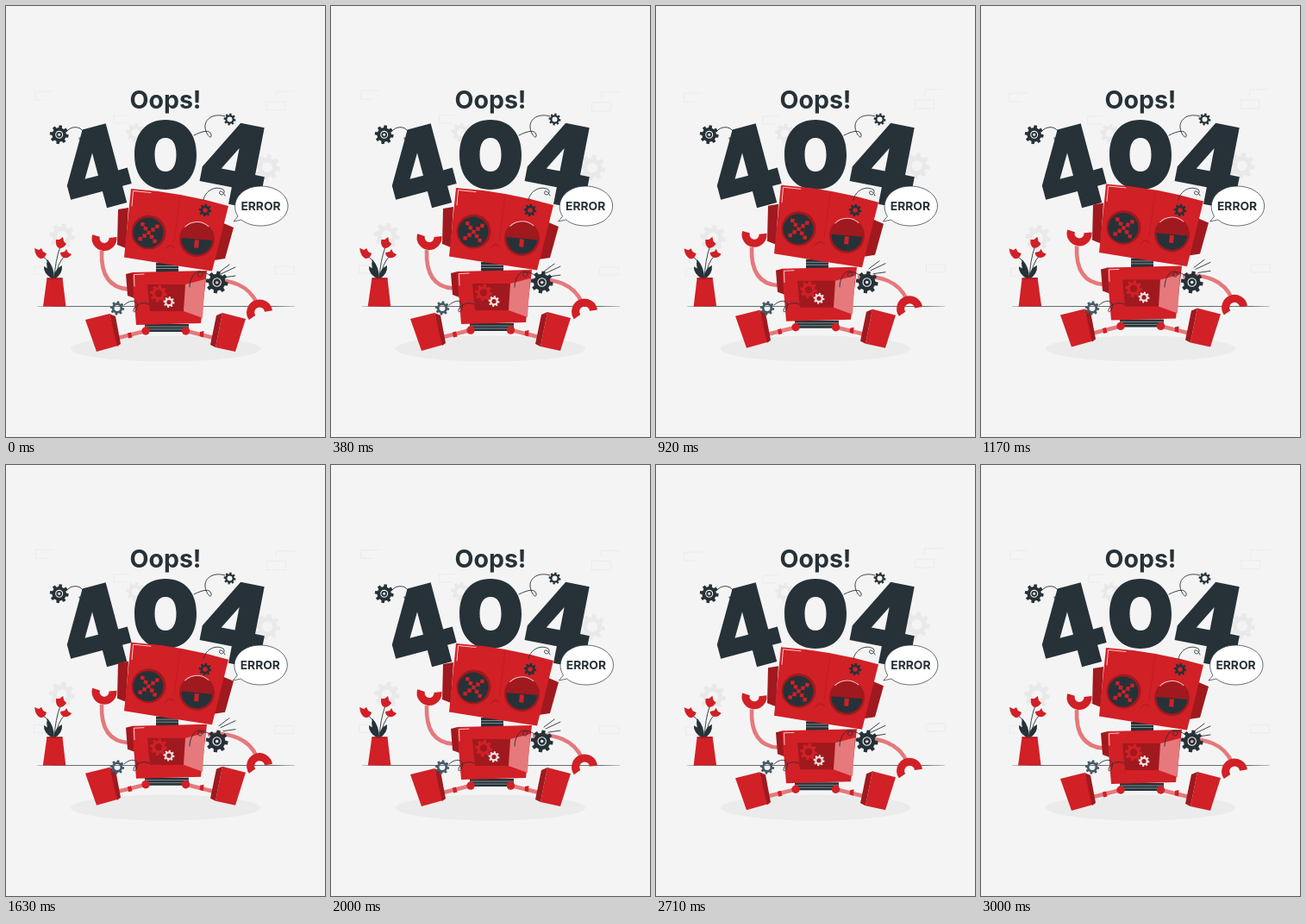
These frames come from a looping animation (370x500 px, 3040 ms). An HTML page:

```html
<!DOCTYPE html>
<html lang="en">
<head>
<meta charset="utf-8">
<title>Oops! 404</title>
<style>
  html, body { margin: 0; width: 100%; height: 100%; overflow: hidden; background: #f4f4f4; }
  svg { display: block; width: 370px; height: 500px; }
  text { font-family: Inter, "Open Sans", sans-serif; font-weight: 700; fill: #263238; text-anchor: middle; }
  .ink { fill: #263238; }
  .red { fill: #d12026; }
  .deep { fill: #a0191e; }
  .pale { fill: #ebebeb; }
  .wire { fill: none; stroke: #263238; stroke-width: .9; stroke-linecap: round; }
  .limb { fill: none; stroke: #e5797c; stroke-width: 4.6; }
  .claw { fill: none; stroke: #d12026; stroke-width: 9; }
  .frame { fill: none; stroke: #e9e9e9; stroke-width: .8; }
  .shine { fill: none; stroke: #f6c9ca; stroke-width: 1; stroke-linecap: round; }
</style>
</head>
<body>
<svg viewBox="0 0 370 500">
  <defs>
    <path id="four" fill-rule="evenodd" d="M-8-45H20V11H31V30H20V50H-4V30H-42V13ZM-4-16L-20 11H-4Z"/>
    <linearGradient id="fade" gradientUnits="userSpaceOnUse" x1="35" x2="336" y1="0" y2="0">
      <stop offset="0" stop-color="#263238" stop-opacity=".3"/>
      <stop offset=".08" stop-color="#263238"/>
      <stop offset=".92" stop-color="#263238"/>
      <stop offset="1" stop-color="#263238" stop-opacity=".3"/>
    </linearGradient>
  </defs>

  <g id="backdrop">
    <path class="frame" d="M55 99H34V109H48M335 99H313V106M302 111H324V121H302ZM143 127H125V136H140M53 302H33V311H48M312 302H334V311H312Z"/>
    <g id="paleGears"></g>
  </g>

  <ellipse class="pale" cx="185" cy="397.5" rx="110" ry="15"/>
  <path d="M36 348.5H335" stroke="url(#fade)" stroke-width=".7"/>

  <g id="vase">
    <path class="wire" d="M55 317Q53 296 42 290M56 317Q57 295 63 279M57 317Q60 297 68 290"/>
    <path class="ink" d="M54 317Q43 310 44 302Q53 306 55 317ZM56 317Q55 306 65 301Q66 311 56 317ZM53 316Q45 303 48 294Q56 303 56 316Z"/>
    <path class="red" d="M33 281L38 283 41 281 43 285 47 287Q45 293.500 40 293Q34 291 33 281ZM58 271L62 271 66 268 67 273 70 276Q67 281 62 281Q57 279 58 271ZM63 286L68 285 70 282 72 286 76 288Q73 293 67 292Q63 290 63 286Z"/>
    <path class="red" d="M47.500 315.500H65.500L69.500 348.500H43Z"/>
    <path class="deep" d="M47.500 315.500H65.500V317H47.500Z"/>
  </g>

  <text x="185" y="118.5" font-size="28.500">Oops!</text>
  <g class="ink">
    <use href="#four" transform="translate(108 185) rotate(-15)"/>
    <path fill-rule="evenodd" d="M185 132C207 132 221 147 221 172.500S207 213 185 213S149 198 149 172.500S163 132 185 132ZM185 153C177 153 172.500 160 172.500 172.500S177 192 185 192S197.500 185 197.500 172.500S193 153 185 153Z"/>
    <use href="#four" transform="translate(271.500 181.500) rotate(11)"/>
  </g>

  <g id="robot">
    <path class="limb" d="M162 377L130 385M209 377L241 385"/>
    <path class="red" d="M141 379.500L145 378.500 146.500 384.500 142 385.500ZM225 378L229.500 377 229 384.500 224.500 383Z"/>
    <path class="red" d="M92 364L120 357 130 394 105 401Z"/>
    <path class="deep" d="M120 357L127 360 133 392 129 395Z"/>
    <path class="red" d="M251 356L278 363 266 401 243 396Z"/>
    <path class="deep" d="M251 356L244 359 237 393 243 396Z"/>

    <path class="limb" d="M111 284C110 309 118 327 142 328.500M234 319C260 316 282 324 291 345"/>
    <path class="claw" d="M104.500 266.500A10 10 0 1 0 124 268.500"/>
    <path class="claw" d="M285.500 361.500A10.500 10.500 0 1 1 304.500 354"/>

    <path class="ink" d="M174 298H200V309H174Z"/>
    <path d="M174 301.500H200M174 304.500H200" stroke="#8b9599" stroke-width=".9"/>
    <path class="ink" d="M161 369H212V378H161Z"/>
    <path d="M161 372H212M161 375H212" stroke="#8b9599" stroke-width=".9"/>
    <circle class="red" cx="162" cy="377" r="4.700"/>
    <circle class="red" cx="208.500" cy="377" r="4.700"/>

    <path class="deep" d="M139 311L147 309 149 339 141 336Z"/>
    <path class="red" d="M146 309L233 307 226 368 151 370Z"/>
    <path class="shine" d="M149 325L148.500 311.500 160 311"/>
    <path class="deep" d="M164 323L209 323 206 354 167 354Z"/>
    <g id="chestGears"></g>
    <path fill="#e5797c" d="M208 323L231 317 228 362 206 354Z"/>
    <path class="wire" d="M249 311L266 303M252 315L266 313M247 309L259 300" stroke-width=".7"/>

    <path class="deep" d="M130 236L142 234 139 281 129 277Z"/>
    <path class="deep" d="M250 251L264 257 254 293 241 295Z"/>
    <path class="red" d="M145 212Q203 216 258 232L239 307.500Q188 300 137 291.500Z"/>
    <path class="shine" d="M146 232L147.500 214.500 168 216.500"/>
    <path d="M202 221L195 273" stroke="#b51c21" stroke-width=".7"/>
    <path d="M185 282Q190 274 196 281" fill="none" stroke="#a0191e" stroke-width=".8"/>
    <circle class="deep" cx="165.500" cy="262.500" r="20"/>
    <circle class="ink" cx="165" cy="263" r="17.500"/>
    <g id="brokenEye" class="red" transform="translate(165.500 263) rotate(9)"></g>
    <g transform="translate(221.500 270.500) rotate(5)">
      <circle class="deep" r="20.500"/>
      <path class="ink" d="M-18 0H18A18 18 0 0 1 -18 0Z"/>
      <path class="red" d="M-2.500 1H2.500V10H-2.500Z"/>
      <path class="shine" d="M-15 -13A20 20 0 0 1 12 -16" stroke-width=".8"/>
    </g>
  </g>

  <path class="wire" d="M70 146C75 139 85 139 89 145C93 151 90 156 86 155C83 153 86 149 91 162"/>
  <path class="wire" d="M254 128C242 124 230 130 231 141C232 150 239 156 238 149C236 143 228 145 218 150"/>
  <path class="wire" d="M229 225C231 214 243 208 252 213C255 216 251 221 248 218C246 214 251 213 254 220"/>
  <path class="wire" d="M137 347C145 339 155 342 152 350C150 357 146 356 149 350C153 345 160 343 166 346"/>
  <path class="wire" d="M213 326C213 311 225 303 228 311C227 317 219 313 224 309Q230 307 237 313"/>
  <g id="looseGears"></g>

  <g id="bubble">
    <path d="M264 250L269 244C259 228 272 209 295.500 209C313 209 327 219 327 232S313 255 295.500 255C285 255 278 252 273 248Z" fill="#fff" stroke="#263238" stroke-width=".7"/>
    <text x="295.500" y="237" font-size="13.800">ERROR</text>
  </g>
</svg>
<script>
const LOOP = 3040;
const $ = id => document.getElementById(id);

function add(parent, tag, attrs) {
  const node = document.createElementNS("http://www.w3.org/2000/svg", tag);
  for (const key in attrs) node.setAttribute(key, attrs[key]);
  parent.appendChild(node);
}

const circle = r => `M${r} 0A${r} ${r} 0 1 0 ${-r} 0A${r} ${r} 0 1 0 ${r} 0Z`;

function gear(parent, x, y, r, fill, hole, teeth = 8) {
  const points = [];
  for (let i = 0; i < teeth; i++) {
    [[-.3, .75], [-.2, 1], [.2, 1], [.3, .75]].forEach(([offset, size]) => {
      const angle = (i + offset + .2) / teeth * 2 * Math.PI;
      points.push([Math.cos(angle) * r * size, Math.sin(angle) * r * size].map(v => v.toFixed(2)).join(" "));
    });
  }
  add(parent, "path", {
    d: `M${points.join("L")}Z${circle(r * hole)}`,
    fill, "fill-rule": "evenodd", transform: `translate(${x} ${y})`
  });
}

function ringedGear(parent, x, y, r) {
  gear(parent, x, y, r, "#263238", .14);
  add(parent, "circle", { cx: x, cy: y, r: r * .36, fill: "none", stroke: "#f4f4f4", "stroke-width": 1.1 });
}

gear($("paleGears"), 150, 147, 11, "#e9e9e9", .4);
gear($("paleGears"), 303, 187, 15, "#e9e9e9", .4);
gear($("paleGears"), 65, 267, 15, "#e9e9e9", .4);
gear($("chestGears"), 177, 333.5, 10, "#d12026", .42);
gear($("chestGears"), 189, 343.5, 6.5, "#f1dede", .4);

const loose = $("looseGears");
ringedGear(loose, 61.7, 149.3, 11);
gear(loose, 259.5, 131.5, 7, "#263238", .43);
gear(loose, 231, 237, 7.3, "#263238", .38);
gear(loose, 129, 350.5, 8.2, "#455a64", .42);
ringedGear(loose, 244.7, 320.5, 13);

// Pixel cross on the broken eye
for (let i = -2; i <= 2; i++) {
  for (const j of new Set([i, -i])) {
    add($("brokenEye"), "rect", { x: i * 4.3 - 2.2, y: j * 4.3 - 2.2, width: 4.4, height: 4.4 });
  }
}

// Damped sideways wobble: [time, offset]
const wobble = [[0, 0], [254, 0], [710, -2.2], [1170, 1.6], [1630, -.7], [2050, .5], [2500, -.2], [LOOP, 0]];

const smooth = p => (1 - Math.cos(Math.PI * p)) / 2;

function sample(keys, t) {
  const i = keys.findIndex(key => key[0] > t);
  const [t0, v0] = keys[i - 1], [t1, v1] = keys[i];
  return v0 + (v1 - v0) * smooth((t - t0) / (t1 - t0));
}

function draw(t) {
  const lift = -6.4 * smooth(2 * t / LOOP);
  const phase = .4;
  const sway = .7 * (Math.sin(4 * Math.PI * t / LOOP + phase) - Math.sin(phase));
  $("robot").setAttribute("transform", `translate(0 ${lift})`);
  $("backdrop").setAttribute("transform", `rotate(${sway} 185 205)`);
  $("vase").setAttribute("transform", `rotate(${sway} 55 308)`);
  $("bubble").setAttribute("transform", `translate(${sample(wobble, t)} 0)`);
}

const start = performance.now();
function tick() {
  draw((performance.now() - start) % LOOP);
  requestAnimationFrame(tick);
}
tick();
</script>
</body>
</html>
```
